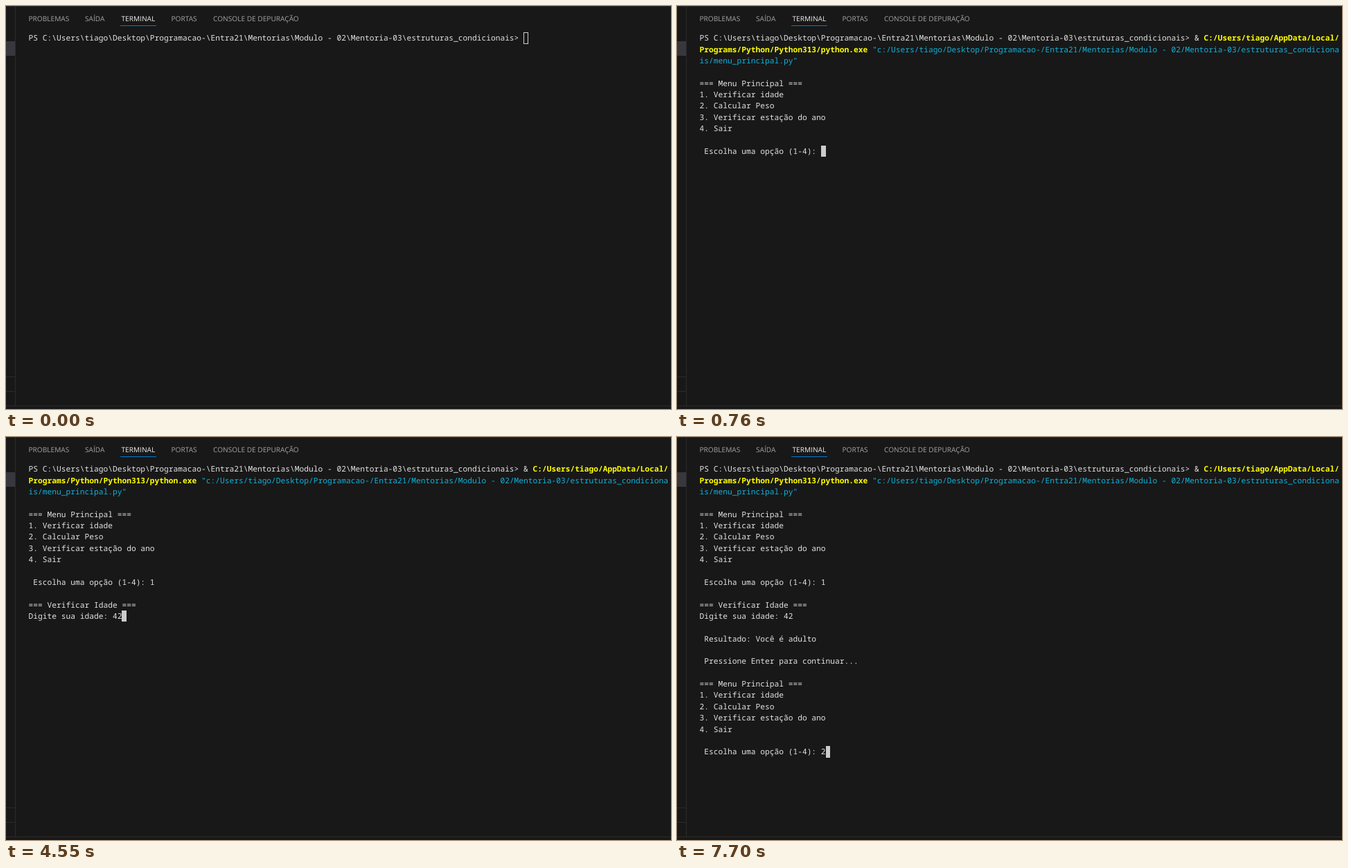
An HTML page that plays this animation: 960 by 583 pixels, repeating every 8 s.

```html
<!DOCTYPE html>
<html lang="pt-BR">
<head>
<meta charset="utf-8">
<title>Terminal</title>
<style>
html, body { margin: 0; width: 100%; height: 100%; overflow: hidden; background: #181818; }
body { position: relative; }
body > * { position: absolute; }
.line { background: #2b2b2b; }
.tab { top: 11px; font: 10.15px/14px "Open Sans", "Noto Sans", sans-serif; color: #a4a4a4; white-space: nowrap; text-rendering: geometricPrecision; }
.active { color: #f0f0f0; }
#term {
  left: 32.6px; top: 39.3px; margin: 0; color: #e2e2e2;
  font: 500 11.24px/16.36px "Noto Sans Mono", monospace;
  white-space: pre; text-rendering: geometricPrecision;
  font-variant-ligatures: none;
}
.command { color: #ff0; font-weight: 700; }
.string { color: #12b0d8; }
.error { color: #dc3a33; }
.cursor { display: inline-block; position: relative; top: -1px; width: .6em; height: 16.36px; vertical-align: top; background: #ccc; }
.hollow { box-sizing: border-box; background: none; border: 1px solid #ccc; }
</style>
</head>
<body>
<div class="line" style="left:0;top:0;width:960px;height:1px"></div>
<div class="line" style="left:13px;top:0;width:1px;height:578px"></div>
<div class="line" style="left:0;top:536px;width:13px;height:1px"></div>
<div class="line" style="left:0;top:557px;width:13px;height:1px"></div>
<div class="line" style="left:0;top:578px;width:960px;height:1px"></div>
<div style="left:0;top:51px;width:13px;height:21px;background:#37373d"></div>
<div class="tab" style="left:32.5px">PROBLEMAS</div>
<div class="tab" style="left:114px">SAÍDA</div>
<div class="tab active" style="left:166.5px">TERMINAL</div>
<div class="tab" style="left:238.5px">PORTAS</div>
<div class="tab" style="left:299px">CONSOLE DE DEPURAÇÃO</div>
<div style="left:165px;top:28px;width:52px;height:1px;background:#0078d4"></div>
<pre id="term"></pre>
<script>
const LOOP = 8000;
const term = document.getElementById('term');
const prompt = 'PS C:\\Users\\tiago\\Desktop\\Programacao-\\Entra21\\Mentorias\\Modulo - 02\\Mentoria-03\\estruturas_condicionais';
const command = [
  ['', '& '],
  ['command', 'C:/Users/tiago/AppData/Local/\nPrograms/Python/Python313/python.exe'],
  ['string', ' "c:/Users/tiago/Desktop/Programacao-/Entra21/Mentorias/Modulo - 02/Mentoria-03/estruturas_condiciona\nis/menu_principal.py"']
];
const menu = `
=== Menu Principal ===
1. Verificar idade
2. Calcular Peso
3. Verificar estação do ano
4. Sair

 Escolha uma opção (1-4): `;

// [start time, characters of the command shown]
const typing = [[500, 40], [560, 99], [620, 158], [690, Infinity]];
// [time, text appended]
const output = [
  [690, '\n'], [760, menu],
  [2880, '1'], [3280, '\n'],
  [3350, '\n=== Verificar Idade ===\nDigite sua idade: '],
  [4350, '4'], [4550, '2'],
  [5030, '\n\n Resultado: Você é adulto\n\n Pressione Enter para continuar...'],
  [6290, '\n' + menu], [7700, '2']
];

const span = (cls, text = '') => `<span class="${cls}">${text}</span>`;

function typed(count) {
  return command.map(([cls, text]) => {
    const part = text.slice(0, Math.max(0, count));
    count -= text.length;
    return span(cls, part);
  }).join('');
}

function screen(t) {
  if (t < 500) return prompt + '&gt; ' + span('cursor hollow');
  const count = typing.findLast(([start]) => t >= start)[1];
  if (t < 690) return prompt + span('error', '&gt; ') + typed(count);
  const printed = output.filter(([start]) => t >= start).map(([, text]) => text).join('');
  return prompt + '&gt; ' + typed(count) + printed + span('cursor');
}

let shown;
function draw(now) {
  const html = screen(now % LOOP);
  if (html !== shown) term.innerHTML = shown = html;
  requestAnimationFrame(draw);
}
draw(performance.now());
</script>
</body>
</html>
```
